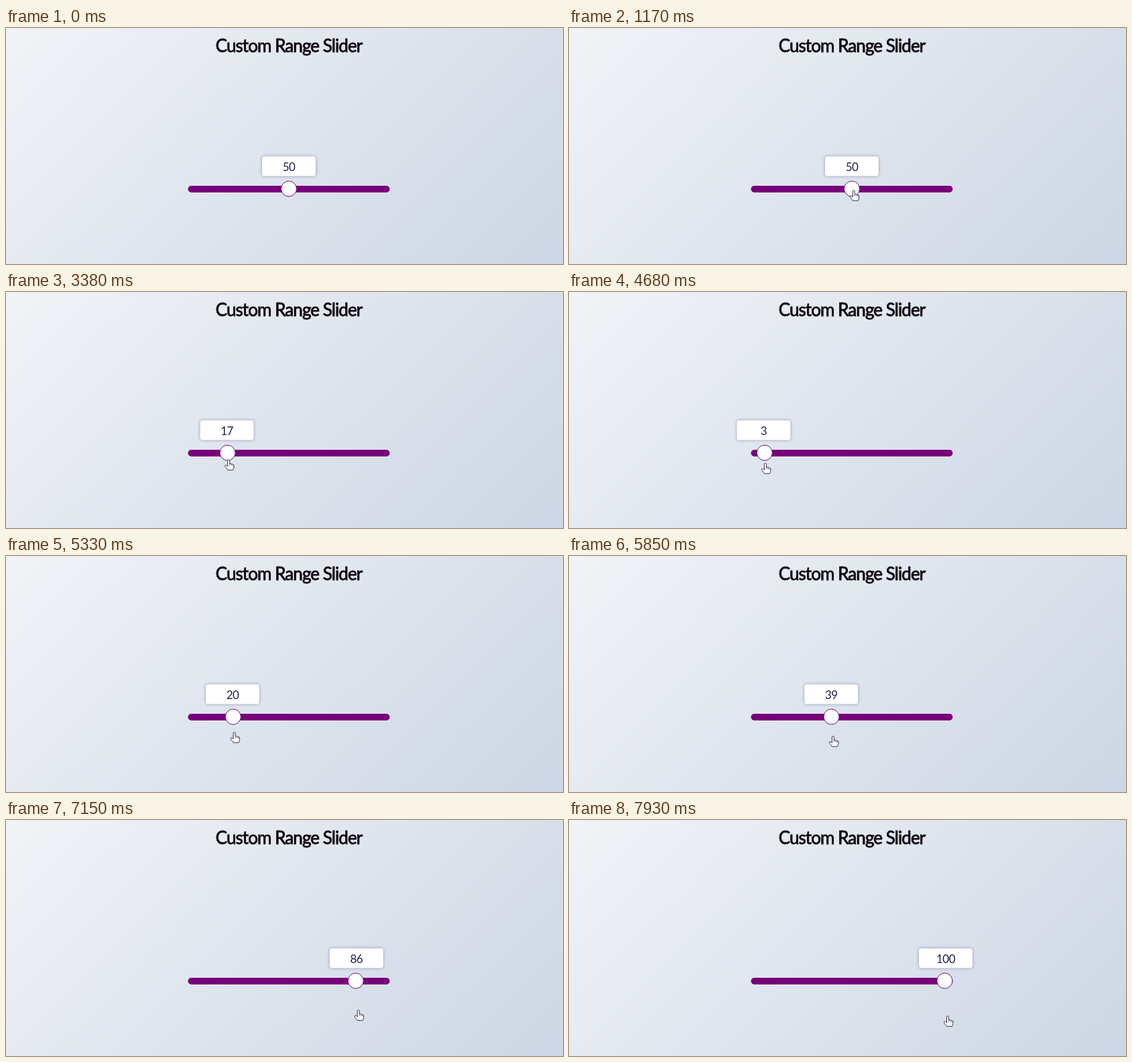
An HTML page for the animation above (8 s loop, 831 px wide and 353 px high).

```html
<!DOCTYPE html>
<html lang="en">
<head>
<meta charset="utf-8">
<title>Custom Range Slider</title>
<style>
  html, body { margin: 0; width: 100%; height: 100%; overflow: hidden; }
  body { background: linear-gradient(135deg, #f1f3f7, #ccd6e5); }
  svg { display: block; width: 831px; height: 353px; }
  text { font-family: Lato, sans-serif; text-anchor: middle; }
  .title { font-size: 26px; letter-spacing: -.93px; fill: #0e0412; stroke: #0e0412; stroke-width: .8px; }
  .value { font-size: 17px; letter-spacing: -.6px; fill: #2a1a4c; }
  .box { fill: #fff; filter: drop-shadow(0 0 2px rgba(70, 55, 120, .5)); }
  .thumb { fill: #fff; stroke: #64127a; }
  .hand { fill: #fff; stroke: #34304a; stroke-linejoin: round; }
</style>
</head>
<body>
<svg viewBox="0 0 831 353">
  <text class="title" x="422" y="36">Custom Range Slider</text>
  <rect x="271.5" y="236" width="301" height="10" rx="5" fill="#780079"/>
  <g id="tip">
    <rect class="box" x="-40" y="192" width="80" height="29.5" rx="4"/>
    <text class="value" id="value" y="213.5"></text>
  </g>
  <circle class="thumb" id="thumb" cy="240.5" r="11.5"/>
  <g id="cursor">
    <path class="hand" d="M-1.5 10V1.5Q-1.5 0 0 0T1.5 1.5V6Q3 5 4 6.6Q5.6 5.8 6.2 7.3Q8 6.8 8 8.8V11Q8 13 6.5 15.5H-1.5Q-3 13-5.3 10.4Q-6.2 8.6-4.7 8.2Q-3.2 8-1.5 10Z"/>
    <path d="M1.5 6V9M4 6.8V9M6.2 7.4V9.5" fill="none" stroke="#34304a" stroke-width=".7"/>
  </g>
</svg>
<script>
const LOOP = 8000, STEP = 130;
const drags = [
  { from: 1300, to: 2600, value: 28 },
  { from: 2730, to: 3640, value: 12 },
  { from: 3770, to: 4160, value: 0 },
  { from: 4290, to: 7150, value: 86, ramp: .338 },
  { from: 7410, to: 7930, value: 100 }
];
const $ = id => document.getElementById(id);
const tip = $('tip'), value = $('value'), thumb = $('thumb'), cursor = $('cursor');
const move = (el, x, y) => el.setAttribute('transform', `translate(${x} ${y})`);
const progress = (t, from, to) => Math.min(1, Math.max(0, (t - from) / (to - from)));
const easeOut = p => p * (2 - p);

// Speeds up during the ramp share of the move, then keeps a constant speed.
const accelerate = (p, ramp) =>
  (p < ramp ? p * p / (2 * ramp) : p - ramp / 2) / (1 - ramp / 2);

const sliderValue = t => Math.round(drags.reduce((v, d) =>
  v + (d.value - v) * accelerate(progress(t, d.from, d.to), d.ramp || 0), 50));

function draw(ms) {
  const t = Math.floor((ms % LOOP) / STEP) * STEP;
  const v = sliderValue(t), x = 283.5 + v * 2.77;
  value.textContent = v;
  move(tip, 282 + v * 2.8, 0);
  thumb.setAttribute('cx', x);

  // The pointer arrives from below, then sinks slowly away from the thumb.
  const away = 1 - progress(t, 130, 1170);
  const sink = 9 * easeOut(progress(t, 1300, 4290)) + 41.5 * progress(t, 4290, 7930);
  cursor.setAttribute('visibility', t ? 'visible' : 'hidden');
  move(cursor, x + 1 + v * .035 + 14 * away, 242.7 + 18 * away + sink);
}

const start = performance.now();
function frame() {
  draw(performance.now() - start);
  requestAnimationFrame(frame);
}
frame();
</script>
</body>
</html>
```
